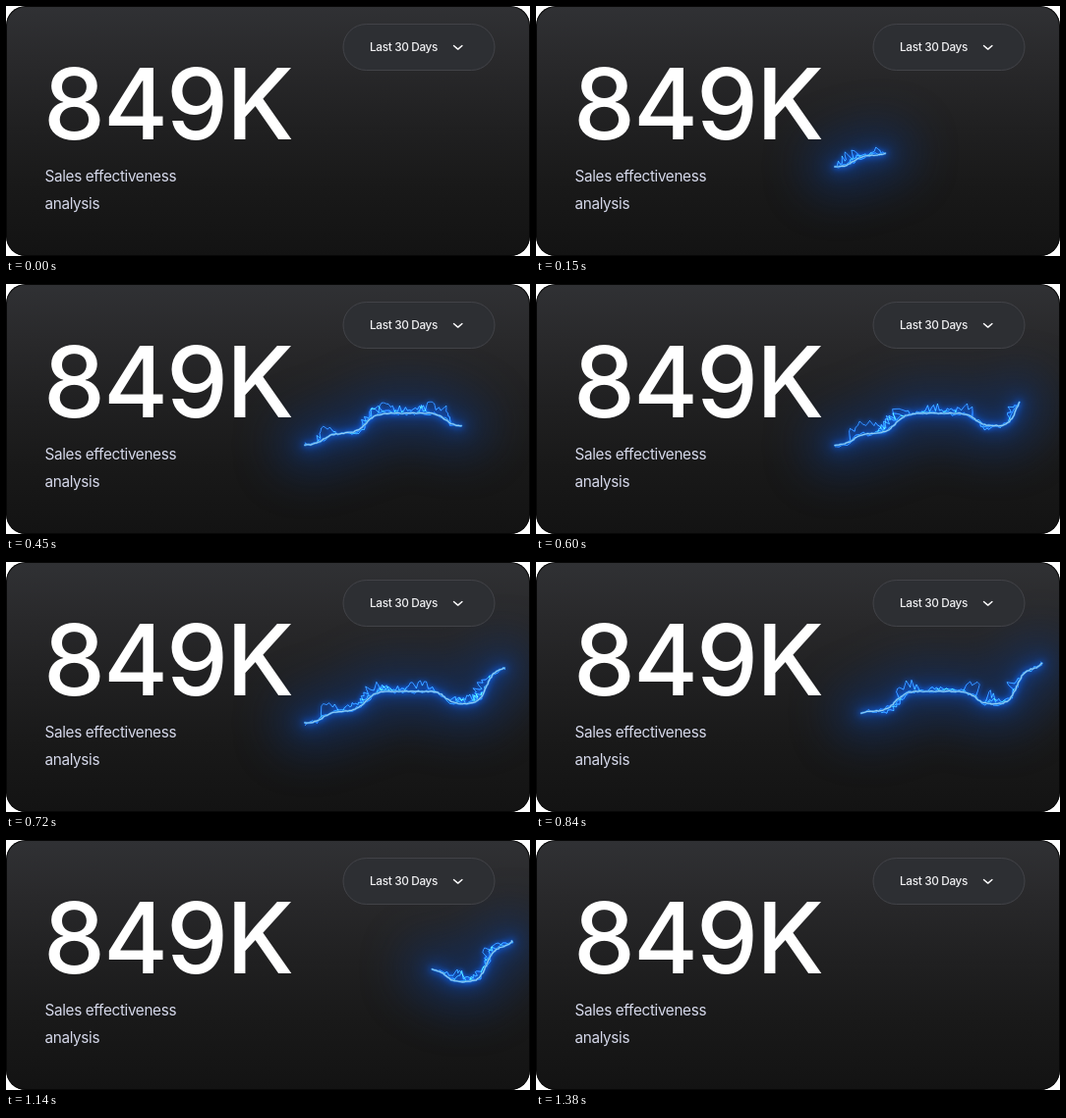
Animation, 533 px wide and 255 px high, one loop 1800 ms. Source, as an HTML page with a canvas:

```html
<!DOCTYPE html>
<html lang="en">
<head>
<meta charset="utf-8">
<title>Sales effectiveness</title>
<style>
  html, body { margin: 0; width: 100%; height: 100%; overflow: hidden; background: #fff; }
  .card {
    position: relative; width: 533px; height: 255px; overflow: hidden; border-radius: 20px;
    background: linear-gradient(#303134 0, #29292b 22%, #202021 48%, #191919 72%, #131313 100%);
    font-family: Inter, "Liberation Sans", sans-serif;
  }
  .card::after {
    content: ""; position: absolute; inset: 0; border-radius: inherit;
    box-shadow: inset 0 0 0 1px #080808;
  }
  canvas, svg { position: absolute; left: 0; top: 0; }
  text { fill: #fff; }
  .total { font-size: 100px; font-weight: 500; letter-spacing: -1.8px; }
  .label { font-size: 15.3px; fill: #d5d8ea; letter-spacing: -.35px; }
  .range { font-size: 11.8px; fill: #f0f0f2; letter-spacing: -.35px; font-weight: 500; }
</style>
</head>
<body>
<div class="card">
  <canvas id="bolt" width="533" height="255"></canvas>
  <svg width="533" height="255">
    <rect x="343" y="18.5" width="154" height="47" rx="23.5" fill="#2d2f33" stroke="#424348"/>
    <path d="M455.5 40.5l4.2 3.6 4.2-3.6" fill="none" stroke="#fff" stroke-width="1.4" stroke-linecap="round" stroke-linejoin="round"/>
    <text class="range" x="370" y="46">Last 30 Days</text>
    <text class="total" x="38" y="136">849K</text>
    <text class="label" x="39.5" y="179">Sales effectiveness</text>
    <text class="label" x="39.5" y="207">analysis</text>
  </svg>
</div>
<script>
const LOOP = 1800, STEP = 30, LEFT = 304, RIGHT = 515;
const ctx = document.getElementById('bolt').getContext('2d');
const clamp = v => Math.min(1, Math.max(0, v));

// the curve is a sum of smooth steps
const rise = (x, center, width, amount) => amount / (1 + Math.exp((center - x) / width));
const curveY = x => 164.3 + rise(x, 323, 4.5, -12) + rise(x, 366, 5, -20.5)
  + rise(x, 447, 4, 13) + rise(x, 489, 4, -36) + rise(x, 514, 3, -10);

// points one pixel of arc length apart, with their normals
const trail = [];
for (let x = LEFT; x <= RIGHT;) {
  const slope = curveY(x + .5) - curveY(x - .5);
  const len = Math.hypot(1, slope);
  trail.push({ x, y: curveY(x), nx: slope / len, ny: -1 / len });
  x += 1 / len;
}
const END = trail.length - 1;

function random(seed) {
  let s = seed * 7919 + 12345;
  const next = () => (s = s * 16807 % 2147483647) / 2147483647;
  next();
  next();
  return next;
}

// offset(u) pushes the strand off the curve, u running from 0 to 1
function strand(from, to, gap, offset) {
  const path = new Path2D();
  for (let d = from; ; d = Math.min(to, d + gap)) {
    const p = trail[Math.round(d)], h = offset((d - from) / (to - from));
    path.lineTo(p.x + p.nx * h, p.y + p.ny * h);
    if (d >= to) return path;
  }
}

function stroke(path, color, width, blur = 0) {
  ctx.filter = blur ? `blur(${blur}px)` : 'none';
  ctx.strokeStyle = color;
  ctx.lineWidth = width;
  ctx.stroke(path);
}

// each batch of sparks keeps its place while its shape flickers
function drawSparks(t, from, to, jitter) {
  const place = random(Math.floor(t / 90) + 5);
  const count = 2 + Math.round((to - from) / 40);
  for (let i = 0; i < count; i++) {
    const size = Math.min(to - from, 12 + 26 * place());
    const start = from + (to - from - size) * (i + place()) / count;
    const height = (5 + 11 * place()) * (place() < .2 ? -.5 : 1);
    const path = strand(start, start + size, 2, u =>
      height * Math.sqrt(Math.sin(Math.PI * clamp(u))) * (.15 + .85 * jitter()));
    stroke(path, 'rgba(25,95,210,.35)', 3, 2);
    stroke(path, 'rgba(65,155,235,.8)', .8);
  }
}

function draw(t) {
  ctx.clearRect(0, 0, 533, 255);
  const to = END * Math.sin(clamp((t - 30) / 840) * Math.PI / 2);
  const from = END * clamp((t - 720) / 660) ** 1.25;
  if (to - from < 1) return;

  const jitter = random(t);
  const noise = size => () => (jitter() - .5) * size;
  const core = strand(from, to, 2, noise(1));
  ctx.lineCap = ctx.lineJoin = 'round';
  ctx.globalCompositeOperation = 'lighter';

  stroke(core, 'rgba(14,55,125,.5)', 58, 22);
  stroke(core, 'rgba(18,75,180,.32)', 16, 8);
  stroke(core, 'rgba(25,100,225,.5)', 5, 3);
  stroke(strand(from, to, 4, noise(5)), 'rgba(50,140,230,.75)', .9);
  drawSparks(t, from, to, jitter);

  ctx.globalCompositeOperation = 'source-over';
  stroke(core, '#2c86dc', 2.2);
  stroke(core, '#92cdf6', 1.1);
}

function frame(now) {
  draw(Math.floor(now % LOOP / STEP) * STEP);
  requestAnimationFrame(frame);
}
requestAnimationFrame(frame);
</script>
</body>
</html>
```
